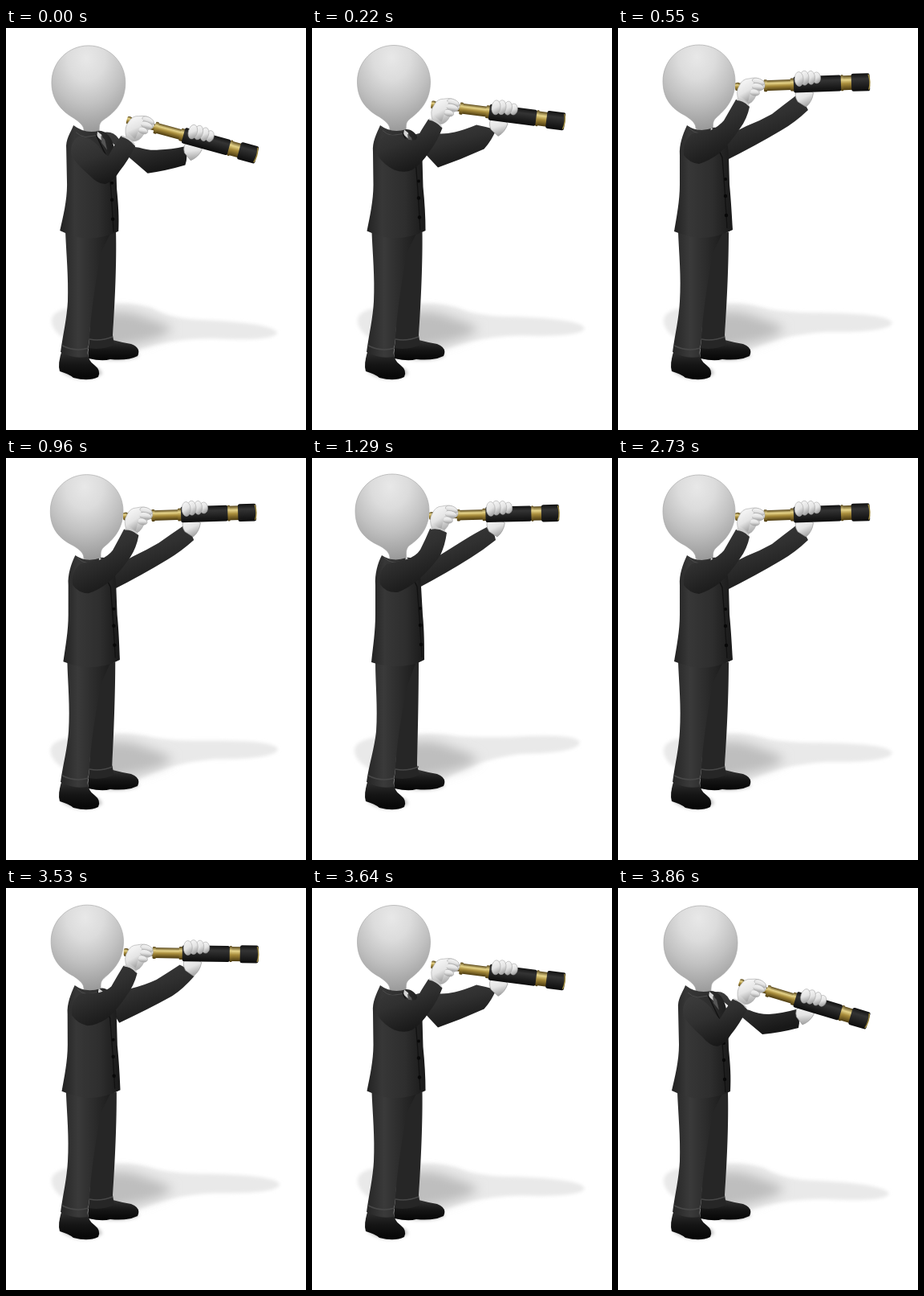
An HTML page that plays this animation: 374 px wide and 500 px high, repeating every 6260 ms.

```html
<!DOCTYPE html>
<html lang="en">
<head>
<meta charset="utf-8">
<title>Figure with a telescope</title>
<style>
  html, body { margin: 0; width: 100%; height: 100%; overflow: hidden; background: #fff; }
  svg { display: block; width: 100vw; height: 100vh; }
</style>
</head>
<body>
<svg viewBox="0 0 374 500">
  <defs>
    <radialGradient id="skin" cx=".47" cy=".14" r=".85">
      <stop offset="0" stop-color="#e8e8e8"/><stop offset=".3" stop-color="#dcdcdc"/>
      <stop offset=".6" stop-color="#c2c2c2"/><stop offset="1" stop-color="#989898"/>
    </radialGradient>
    <linearGradient id="hand" x2=".4" y2="1">
      <stop offset="0" stop-color="#fafafa"/><stop offset=".6" stop-color="#e4e4e4"/><stop offset="1" stop-color="#a8a8a8"/>
    </linearGradient>
    <linearGradient id="coat">
      <stop offset="0" stop-color="#222"/><stop offset=".25" stop-color="#373737"/>
      <stop offset=".65" stop-color="#2e2e2e"/><stop offset="1" stop-color="#191919"/>
    </linearGradient>
    <linearGradient id="sleeve" x2=".5" y2="1">
      <stop offset="0" stop-color="#3d3d3d"/><stop offset=".5" stop-color="#303030"/><stop offset="1" stop-color="#181818"/>
    </linearGradient>
    <linearGradient id="leg">
      <stop offset="0" stop-color="#262626"/><stop offset=".35" stop-color="#3a3a3a"/><stop offset="1" stop-color="#1d1d1d"/>
    </linearGradient>
    <linearGradient id="gold" x2="0" y2="1">
      <stop offset="0" stop-color="#57451a"/><stop offset=".3" stop-color="#e6d48a"/>
      <stop offset=".55" stop-color="#a98d3c"/><stop offset="1" stop-color="#4a390f"/>
    </linearGradient>
    <linearGradient id="grip" x2="0" y2="1">
      <stop offset="0" stop-color="#111"/><stop offset=".3" stop-color="#343434"/><stop offset="1" stop-color="#0c0c0c"/>
    </linearGradient>
    <linearGradient id="shoe" x2="0" y2="1">
      <stop offset="0" stop-color="#333"/><stop offset=".5" stop-color="#151515"/><stop offset="1" stop-color="#050505"/>
    </linearGradient>
    <filter id="soft" x="-20%" y="-30%" width="140%" height="160%"><feGaussianBlur stdDeviation="2"/></filter>
    <filter id="softer" x="-30%" y="-40%" width="160%" height="180%"><feGaussianBlur stdDeviation="7"/></filter>
  </defs>

  <!-- data-a: lowered, data-b: raised, data-c: turned -->
  <path fill="#e9e9e9" filter="url(#soft)"
    data-a="M57 362 Q60 346 108 346 Q150 338 182 348 Q205 363 250 364 Q330 368 338 380 Q333 391 260 387 Q205 386 160 402 Q112 412 90 396 Q55 380 57 362Z"
    data-b="M57 362 Q60 346 108 346 Q150 338 182 348 Q205 354 250 354 Q338 355 342 367 Q336 379 260 378 Q205 381 160 402 Q112 412 90 396 Q55 380 57 362Z"
    data-c="M53 362 Q56 346 106 346 Q150 340 182 346 Q205 348 250 347 Q330 342 334 354 Q330 367 260 368 Q205 375 160 402 Q112 412 90 396 Q51 380 53 362Z"/>
  <path fill="#bebebe" filter="url(#softer)" d="M98 366 Q130 346 160 355 Q195 366 208 374 Q195 386 160 393 L100 405Z"/>
  <path fill="#bbb" filter="url(#soft)" d="M70 428 Q95 444 120 430 L116 424 L70 418Z M105 408 Q140 418 166 408 L160 402Z"/>

  <path fill="url(#shoe)" d="M104 392 Q101 405 103 411 Q120 415 130 412 Q152 414 164 408 Q169 398 156 393 Q144 391 133 388Z"/>
  <path fill="#262626"
    data-a="M106 256 L137 254 C138 290 136 340 133 382 L135 394 Q120 401 103 398 L104 380 C106 340 108 300 106 256Z"
    data-b="M106 256 L138 254 C138 290 136 340 133 382 L135 394 Q120 401 103 398 L104 380 C106 340 108 300 106 256Z"
    data-c="M106 256 L133 254 C133 290 132 340 131 382 L134 394 Q120 401 103 398 L104 380 C106 340 108 300 106 256Z"/>
  <path fill="none" stroke="#484848" stroke-width="1.5" d="M104 387 Q118 390 133 384"/>
  <path fill="url(#shoe)" d="M70 400 Q64 418 67 427 Q78 430 84 435 Q103 440 115 434 Q119 426 110 419 Q103 415 101 402Z"/>
  <path fill="url(#leg)"
    data-a="M74 254 C75 280 78 310 77 340 C76 360 71 382 68 403 Q84 412 101 409 L104 386 C106 350 113 310 118 280 L130 256Z"
    data-b="M75 254 C76 280 79 310 77 340 C76 360 71 382 68 403 Q84 412 101 409 L104 386 C106 350 113 310 118 280 L130 256Z"
    data-c="M79 254 C79 280 82 310 80 340 C78 360 71 382 68 403 Q84 412 101 409 L104 386 C106 350 113 310 120 280 L129 256Z"/>
  <path fill="none" stroke="#484848" stroke-width="1.5" d="M70 395 Q86 403 103 398"/>

  <path fill="url(#sleeve)"
    data-a="M118 130 Q132 126 139 139 Q150 150 164 152 Q175 157 188 157 Q204 156 222 151 Q228 162 225 174 Q202 180 180 182 Q158 179 132 174Z"
    data-b="M124 140 Q142 131 160 122 Q176 116 192 107 Q206 96 222 84 Q232 90 237 102 Q220 118 204 127 Q172 146 134 165Z"
    data-c="M122 140 Q142 134 156 123 Q172 113 188 103 Q204 93 218 86 Q228 92 229 102 Q214 114 198 124 Q168 143 130 163Z"/>

  <path fill="url(#skin)" stroke="#aaa" stroke-width=".7"
    data-a="M103 22 C128 22 149 42 149 68 C149 92 136 105 122 114 C116 118 116 121 116 130 Q106 136 97 129 C98 123 93 118 84 112 C67 102 57 88 57 68 C57 42 78 22 103 22Z"
    data-b="M101 21 C126 21 146 41 146 66 C146 90 133 102 122 112 C118 116 118 120 119 127 Q108 132 97 125 C97 119 93 115 84 109 C66 100 56 87 56 66 C56 41 76 21 101 21Z"
    data-c="M100 20 C125 20 146 40 146 65 C146 88 133 101 121 109 C117 113 117 118 118 127 Q108 131 97 125 C97 118 93 114 84 109 C64 100 54 87 54 66 C54 40 75 20 100 20Z"/>
  <path fill="url(#coat)"
    data-a="M84 121 C80 131 74 138 75 150 L76 195 C76 215 71 235 67 252 Q85 261 102 262 Q125 261 140 253 C141 235 140 220 138 200 L137 165 C136 145 130 129 116 128 Q98 132 84 121Z"
    data-b="M86 121 C81 132 76 145 77 158 L77 195 C77 215 73 235 70 253 Q85 259 100 261 Q125 261 143 251 C142 235 141 215 139 195 L138 160 C138 140 130 122 119 124 Q100 131 86 121Z"
    data-c="M87 121 C82 130 78 145 79 158 L79 195 C79 215 76 235 74 254 Q85 258 100 259 Q125 260 140 251 C140 235 140 215 138 195 L136 160 C136 140 130 122 118 124 Q100 130 87 121Z"/>
  <g data-a="translate(0 0)" data-b="translate(2 -5)" data-c="translate(3 -6)">
    <path fill="#d4d4d4" d="M114 129 L119 133 L120 141 L113 135Z"/>
    <path fill="#555" d="M118 134 L123 139 L126 152 L119 143Z"/>
    <path fill="none" stroke="#111" stroke-width="1.3" d="M112 133 L128 166 L131 205 L134 254"/>
    <path fill="none" stroke="#4c4c4c" d="M87 130 Q92 135 99 136 L112 134"/>
    <g fill="#080808"><circle cx="132" cy="193" r="2"/><circle cx="132" cy="214" r="2.2"/><circle cx="133" cy="238" r="2.2"/></g>
  </g>

  <g fill="url(#hand)" data-a="translate(241 144) rotate(17)" data-b="translate(236 70) rotate(-3)" data-c="translate(233 70) rotate(-2)">
    <path stroke="#999" stroke-width=".7" d="M-13 4 Q-18 13 -13 21 L-3 28 Q5 22 7 11 Q1 6 -5 9Z"/>
  </g>
  <g data-a="translate(151 117.500) rotate(16.600) scale(1)" data-b="translate(146 73) rotate(-2) scale(1)" data-c="translate(146 72) rotate(-1.3) scale(.965)">
    <g fill="url(#gold)">
      <rect y="-5" width="6" height="10" rx="2"/>
      <rect x="4" y="-4" width="34" height="8"/>
      <rect x="36" y="-6.5" width="40" height="13"/>
      <rect x="36" y="-7.5" width="4" height="15" rx="1"/>
      <rect x="69" y="-8" width="5" height="16" rx="1"/>
      <rect x="131" y="-9" width="17" height="18"/>
      <rect x="132" y="-10" width="3" height="20" rx="1"/>
    </g>
    <g fill="url(#grip)">
      <rect x="73" y="-10" width="59" height="20" rx="2"/>
      <rect x="145" y="-11" width="23" height="22" rx="2.5"/>
    </g>
    <path fill="none" stroke="#a08a3e" stroke-width="1.4" d="M166.500 -9.500 Q169.500 0 166.500 9.500"/>
  </g>
  <g fill="url(#hand)" stroke="#a8a8a8" stroke-width=".6" data-a="translate(241 144) rotate(17)" data-b="translate(236 70) rotate(-3)" data-c="translate(233 70) rotate(-2)">
    <ellipse cx="12" cy="-7.500" rx="5" ry="7"/><ellipse cx="5" cy="-8" rx="5" ry="8.500"/>
    <ellipse cx="-3" cy="-8" rx="5.500" ry="9"/><ellipse cx="-10" cy="-7" rx="5.500" ry="9"/>
  </g>

  <g fill="url(#hand)" stroke="#a8a8a8" stroke-width=".6" data-a="translate(166 127.500) rotate(8)" data-b="translate(165 77) rotate(0)" data-c="translate(164 74) rotate(0)">
    <path d="M-14 15 Q-19 2 -14 -5 Q-10 -14 -2 -14 Q9 -17 15 -11 Q20 -7 17 -2 Q9 2 7 7 Q3 17 -5 18Z"/>
    <ellipse cx="10" cy="-10" rx="8" ry="4.200" transform="rotate(20 10 -10)"/>
    <ellipse cx="9" cy="-4" rx="8" ry="4.200" transform="rotate(14 9 -4)"/>
    <ellipse cx="5" cy="3" rx="6.500" ry="4" transform="rotate(14 5 3)"/>
    <path stroke="none" d="M-13 8 Q-16 -2 -9 -9 Q-2 -14 4 -10 Q0 2 -3 15Z"/>
  </g>
  <path fill="url(#sleeve)"
    data-a="M90 135 Q104 135 115 148 Q122 159 127 163 Q134 150 143 138 Q154 141 161 151 Q151 170 141 182 Q134 194 124 197 Q115 197 104 184 Q90 172 82 160 Q78 144 90 135Z"
    data-b="M92 132 Q104 129 116 127 Q126 122 132 115 Q140 101 147 89 Q157 89 164 98 Q161 113 152 125 Q140 143 126 156 Q114 165 101 169 Q89 168 82 158 Q80 142 92 132Z"
    data-c="M93 132 Q106 129 118 126 Q130 122 135 114 Q142 100 147 88 Q158 86 168 93 Q166 108 160 121 Q148 138 133 151 Q120 162 107 167 Q92 168 85 157 Q82 142 93 132Z"/>
  <path fill="none" stroke="#ccc" stroke-width="1.800"
    data-a="M144 138 Q154 141 160 149" data-b="M148 89 Q156 89 163 96" data-c="M148 88 Q157 86 166 91"/>
</svg>
<script>
const LOOP = 6260, STEP = 110;
// [start, steps, pose before, pose after]
const moves = [[0, 6, 'a', 'b'], [850, 5, 'b', 'c'], [2290, 5, 'c', 'b'], [3530, 4, 'b', 'a']];
const parts = [...document.querySelectorAll('[data-a]')];
const number = /-?\d*\.?\d+/g;
const ease = t => t * t * (3 - 2 * t);

function mix(from, to, p) {
  const ends = to.match(number);
  let i = 0;
  return from.replace(number, v => +(+v + (ends[i++] - v) * p).toFixed(3));
}

function draw(now) {
  const time = now % LOOP;
  const [start, steps, from, to] = moves.findLast(m => m[0] <= time);
  const p = ease(Math.min(1, (Math.floor((time - start) / STEP) + 1) / steps));
  for (const part of parts) {
    const attribute = part.tagName === 'g' ? 'transform' : 'd';
    part.setAttribute(attribute, mix(part.dataset[from], part.dataset[to], p));
  }
}

const begin = performance.now();
function tick() {
  draw(performance.now() - begin);
  requestAnimationFrame(tick);
}
tick();
</script>
</body>
</html>
```
